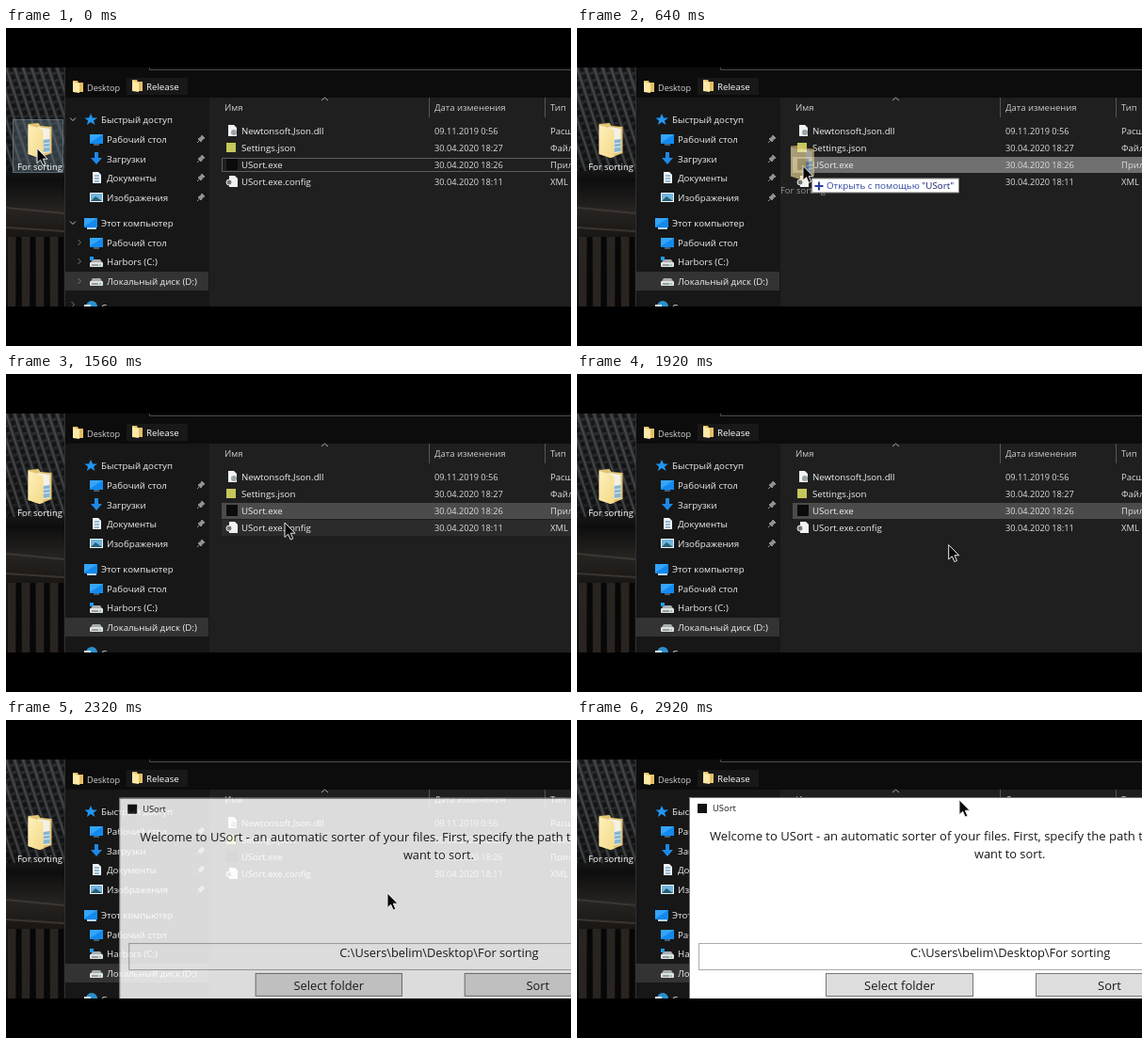
An HTML page that plays this animation: 600x338 px, repeating every 2960 ms.

```html
<!DOCTYPE html>
<html lang="ru">
<head>
<meta charset="utf-8">
<title>Folder drop</title>
<style>
html, body { margin: 0; width: 100%; height: 100%; overflow: hidden; background: #000; }
svg { display: block; width: 100vw; height: 100vh; }
text { font-family: "Open Sans", "Noto Sans", sans-serif; white-space: pre; }
</style>
</head>
<body>
<svg id="stage" viewBox="0 0 600 338">
  <defs>
    <linearGradient id="wall" x2="0" y2="1">
      <stop offset="0" stop-color="#2b2d30"/><stop offset=".4" stop-color="#1e1f20"/>
      <stop offset=".47" stop-color="#0d0d0d"/><stop offset=".6" stop-color="#262321"/>
      <stop offset=".72" stop-color="#171412"/><stop offset="1" stop-color="#0f0d0c"/>
    </linearGradient>
    <linearGradient id="flap" x2="1" y2="1">
      <stop offset="0" stop-color="#fff1bd"/><stop offset="1" stop-color="#f3d987"/>
    </linearGradient>
    <g id="folder">
      <path d="M-13-17L-2-18L0-15L12-14V14L-1 19L-13 15Z" fill="#e3c472"/>
      <path d="M-3-14L10-12V13L-3 15Z" fill="#f3f1e6"/>
      <path d="M3 0L10-1V12L3 13Z" fill="#86b4d2"/>
      <path d="M3 4L10 3M3 8L10 7" stroke="#e3edf1"/>
      <path d="M-13-16L0-12Q3-11 3-8V18L-1 19L-13 15Z" fill="url(#flap)"/>
    </g>
    <g id="tabFolder">
      <path d="M0 0H5L6 2H11V12H0Z" fill="#e5bf62"/>
      <path d="M0 1L7 3V13L0 12Z" fill="#ffe9a8"/>
    </g>
    <path id="pin" d="M1-4L4-1L2 0L0 3L-3 0L0-2ZM-1.5 1.5L-4 4" fill="#8f9498" stroke="#8f9498"/>
    <g id="monitor">
      <rect x="-7" y="-5" width="14" height="10" fill="#1389ee"/>
      <path d="M-7-5H7L-7 4Z" fill="#34a5fa"/>
      <path d="M-3 6H3" stroke="#6aa9d8"/>
    </g>
    <g id="drive">
      <path d="M-6 0L-4-3H4L6 0Z" fill="#a9adb0"/>
      <rect x="-7" y="0" width="14" height="5" rx="1" fill="#dfe2e3"/>
      <path d="M-5 3H2" stroke="#555"/><path d="M3 3H5" stroke="#37b24a"/>
    </g>
    <path id="page" d="M-4-6H2L5-3V6H-4Z" fill="#f2f2f2"/>
  </defs>
  <g id="desk"></g>
  <g id="files"></g>
  <g id="app"></g>
  <g id="ghost" opacity=".62"></g>
  <g id="pinTip"></g>
  <g id="openTip"></g>
  <path id="cursor" d="M0 0V15.5L3.6 12.2L6.2 18L8.8 16.9L6.3 11.2H11Z" fill="#080808" stroke="#e8e8e8" stroke-width="1"/>
  <path d="M0 0H600V42H0ZM0 296H600V338H0Z"/>
</svg>
<script>
const $ = id => document.getElementById(id);
const text = (x, y, s, size = 9.7, fill = "#eee", more = "") =>
  `<text x="${x}" y="${y + size * .36}" font-size="${size}" fill="${fill}" ${more}>${s}</text>`;
const rect = (x, y, w, h, fill, more = "") =>
  `<rect x="${x}" y="${y}" width="${w}" height="${h}" fill="${fill}" ${more}/>`;
const line = (d, stroke, more = "") => `<path d="${d}" fill="none" stroke="${stroke}" ${more}/>`;
const use = (id, x, y) => `<use href="#${id}" x="${x}" y="${y}"/>`;

// Desktop: a dim facade, slanted window columns above a ledge and pillars
let desk = rect(0, 42, 62, 254, "url(#wall)");
for (let x = -36; x < 62; x += 9) {
  desk += line(`M${x} 42L${x + 36} 152`, "#5b5d60", 'stroke-width="2" opacity=".55"')
    + line(`M${x + 4.5} 42L${x + 40.5} 152`, "#0b0c0d", 'stroke-width="4" stroke-dasharray="5 3" opacity=".7"');
}
desk += line("M0 191L62 197M0 212L62 216", "#46403b", 'stroke-width="2" opacity=".7"');
for (let x = 2; x < 62; x += 15) {
  desk += rect(x, 222, 8, 74, "#2a2420") + rect(x + 9, 222, 5, 74, "#080707");
}
desk += `<g id="hover">${rect(7.5, 97.5, 53, 56, "#6c8596", 'fill-opacity=".33" stroke="#6f8391" stroke-opacity=".7"')}</g>`;
desk += use("folder", 36.5, 119) + text(12, 148, "For sorting", 9.5, "#fff");
$("desk").innerHTML = desk;

// File manager
const nav = [
  ["Быстрый доступ", 97], ["Рабочий стол", 118, 1], ["Загрузки", 139, 1], ["Документы", 159, 1],
  ["Изображения", 180, 1], ["Этот компьютер", 207], ["Рабочий стол", 228], ["Harbors (C:)", 248],
  ["Локальный диск (D:)", 269], ["Сеть", 297]
];
const rows = [
  ["Newtonsoft.Json.dll", "09.11.2019 0:56", "Расширение"],
  ["Settings.json", "30.04.2020 18:27", "Файл"],
  ["USort.exe", "30.04.2020 18:26", "Приложение"],
  ["USort.exe.config", "30.04.2020 18:11", "XML"]
];
let f = rect(62, 42, 538, 254, "#1f1f1f") + rect(62, 42, 538, 32, "#0c0c0c") + rect(62, 74, 154, 222, "#171717")
  + line("M62.5 42V296", "#303030") + line("M152.5 42V44.5H600", "#4a4a4a")
  + rect(128, 53, 65, 18, "#181818")
  + use("tabFolder", 71, 56) + text(86, 64, "Desktop", 9.1, "#d5d5d5")
  + use("tabFolder", 134, 55) + text(149, 62.5, "Release", 9.7, "#fff")
  + rect(62, 259, 153, 20, "#333");
nav.forEach(([name, y, pinned], i) => {
  f += text([0, 5, 9].includes(i) ? 101 : 107, y + .5, name);
  if (pinned) f += use("pin", 207, y);
});
f += `<path d="M90 91L92 95.5H97L93 98.5L94.5 103L90 100L86 103L87 98.5L83.5 95.5H88Z" fill="#2196f3"/>`
  + use("monitor", 96, 118) + use("monitor", 96, 228) + use("monitor", 90, 207)
  + line("M86 213H96", "#b8d4e6", 'stroke-width="2"')
  + `<path d="M94 132H98V138H102L96 145L90 138H94Z" fill="#1e88e5"/>`
  + use("page", 96, 159) + line("M94 157H99M94 160H99M94 163H99", "#3182b9")
  + rect(89, 175, 14, 10, "#eef3f5") + rect(90, 176, 12, 8, "#72b5dd") + `<path d="M90 184L95 179L102 184Z" fill="#285f75"/>`
  + use("drive", 96, 249) + rect(89, 243, 4, 4, "#1c9cf2") + use("drive", 96, 269)
  + `<circle cx="91" cy="296" r="6" fill="#2d8fcd"/>` + rect(83, 294, 7, 5, "#d7e4ea")
  + `<g id="chevrons">`
  + line("M68 95.5L71 98.5L74 95.5M68 205.5L71 208.5L74 205.5", "#bbb")
  + line([228, 248, 269].map(y => `M76.5 ${y - 3}L79.5 ${y}L76.5 ${y + 3}`).join("") + "M69.5 291L72.5 294L69.5 297", "#777")
  + `</g>`
  + line("M449.5 74V95M572.5 74V95", "#555") + line("M335 77L338.5 74L342 77", "#aaa")
  + text(232, 84.7, "Имя", 9.5, "#ccc") + text(455, 84.7, "Дата изменения", 9.5, "#ccc") + text(578, 84.7, "Тип", 9.5, "#ccc")
  + rect(229.5, 138.5, 380, 14, "none", 'id="focus" stroke="#5d5d5d"')
  + rect(229, 137, 371, 17, "#777", 'id="selected"') + rect(229, 155, 371, 17, "#2b2b2b", 'id="under"');
rows.forEach(([name, date, kind], i) => {
  const y = 109.8 + 18 * i;
  f += text(250, y, name) + text(455, y, date, 9.2, "#ddd") + text(578, y, kind, 9.5, "#ddd");
});
f += use("page", 240, 109) + `<circle cx="242" cy="111" r="3" fill="#9ba5aa"/>`
  + rect(234, 122, 10, 10, "#c5c75a") + rect(234, 139, 12, 12, "#0b0b0b")
  + use("page", 241, 163) + `<circle cx="237" cy="164" r="3" fill="#777" stroke="#eee"/>`
  + line("M88 149.5H215", "#000", 'id="drop" stroke-width="2"');
$("files").innerHTML = f;

// Opening window
const ink = "#191919", button = 'stroke="#777"';
$("app").innerHTML = rect(119, 82, 580, 260, "#fff") + line("M119.5 342V82.5H699", "#777")
  + rect(128, 89, 10, 10, "#111") + text(144, 94, "USort", 9.4, ink)
  + text(141, 123.8, "Welcome to USort - an automatic sorter of your files. First, specify the path to", 13.05, ink)
  + text(422, 142.8, "want to sort.", 12.8, ink)
  + rect(129.5, 237.5, 560, 28, "#fff", 'stroke="#aaa"')
  + text(354, 247.5, "C:\\Users\\belim\\Desktop\\For sorting", 12.85, ink)
  + rect(264.5, 269.5, 156, 24, "#ddd", button) + text(342.5, 282, "Select folder", 12.95, ink, 'text-anchor="middle"')
  + rect(487.5, 269.5, 156, 24, "#ddd", button) + text(565.5, 282, "Sort", 12.95, ink, 'text-anchor="middle"');

// Drag image and hints, placed relative to the pointer tip
$("ghost").innerHTML = use("folder", 0, -4) + text(-24, 26, "For sorting", 9.5, "#ddd");
$("pinTip").innerHTML = rect(5.5, 12.5, 208, 15, "#fff", 'stroke="#888"')
  + line("M12 17.5A3 3 0 1 0 15 22.5M9.5 17H12.5V20", "#3153b5")
  + text(22, 20.3, "Закрепить на панели быстрого доступа", 9.7, "#283a94");
$("openTip").innerHTML = rect(9.5, 13.5, 156, 15, "#fff", 'stroke="#888"')
  + line("M17 17V26M12.5 21.5H21.5", "#2540a5", 'stroke-width="2"')
  + text(25, 21.5, 'Открыть с помощью <tspan fill="#15206c">"USort"</tspan>', 9.8, "#31479f");

const speedUp = u => u * u, slowDown = u => u * (2 - u), smooth = u => u * u * (3 - 2 * u);
const path = [
  [0, 33, 128], [400, 140, 152, speedUp], [840, 266, 145, slowDown], [1160, 266, 145, smooth],
  [1560, 296, 158, speedUp], [2080, 405, 184, slowDown], [2360, 405, 184, smooth],
  [2800, 406, 85, smooth], [2960, 406, 85, smooth]
];
const clamp = v => Math.max(0, Math.min(1, v));
const show = (id, v) => $(id).setAttribute("opacity", +v);
const move = (id, x, y) => $(id).setAttribute("transform", `translate(${x} ${y})`);

function pointer(t) {
  const i = path.findIndex(p => p[0] > t), [t0, x0, y0] = path[i - 1], [t1, x1, y1, ease] = path[i];
  const u = ease((t - t0) / (t1 - t0));
  return [x0 + (x1 - x0) * u, y0 + (y1 - y0) * u];
}

function draw() {
  const t = Math.floor(performance.now() % 2960 / 40) * 40;
  const [x, y] = pointer(t);
  const dragging = t >= 40 && t < 1120, overNav = x > 66 && x < 216, overExe = x > 229;
  for (const id of ["cursor", "ghost", "pinTip", "openTip"]) move(id, x, y);
  show("hover", x < 62);
  show("ghost", dragging ? .62 : 0);
  show("pinTip", dragging && overNav);
  show("openTip", dragging && overExe);
  show("drop", dragging && overNav);
  show("chevrons", clamp((200 - x) / 150));
  show("focus", !overExe);
  show("selected", overExe && t < 2000);
  $("selected").setAttribute("fill", dragging ? "#707070" : "#4b4b4b");
  show("under", t > 1400 && t < 1720);
  const grow = clamp((t - 2110) / 260);
  const scale = 1 - .06 * (1 - grow) ** 1.6;
  show("app", t < 2120 ? 0 : clamp((t - 2104) / 256));
  $("app").setAttribute("transform", `translate(409 258) scale(${scale}) translate(-409 -258)`);
  requestAnimationFrame(draw);
}
draw();
</script>
</body>
</html>
```
